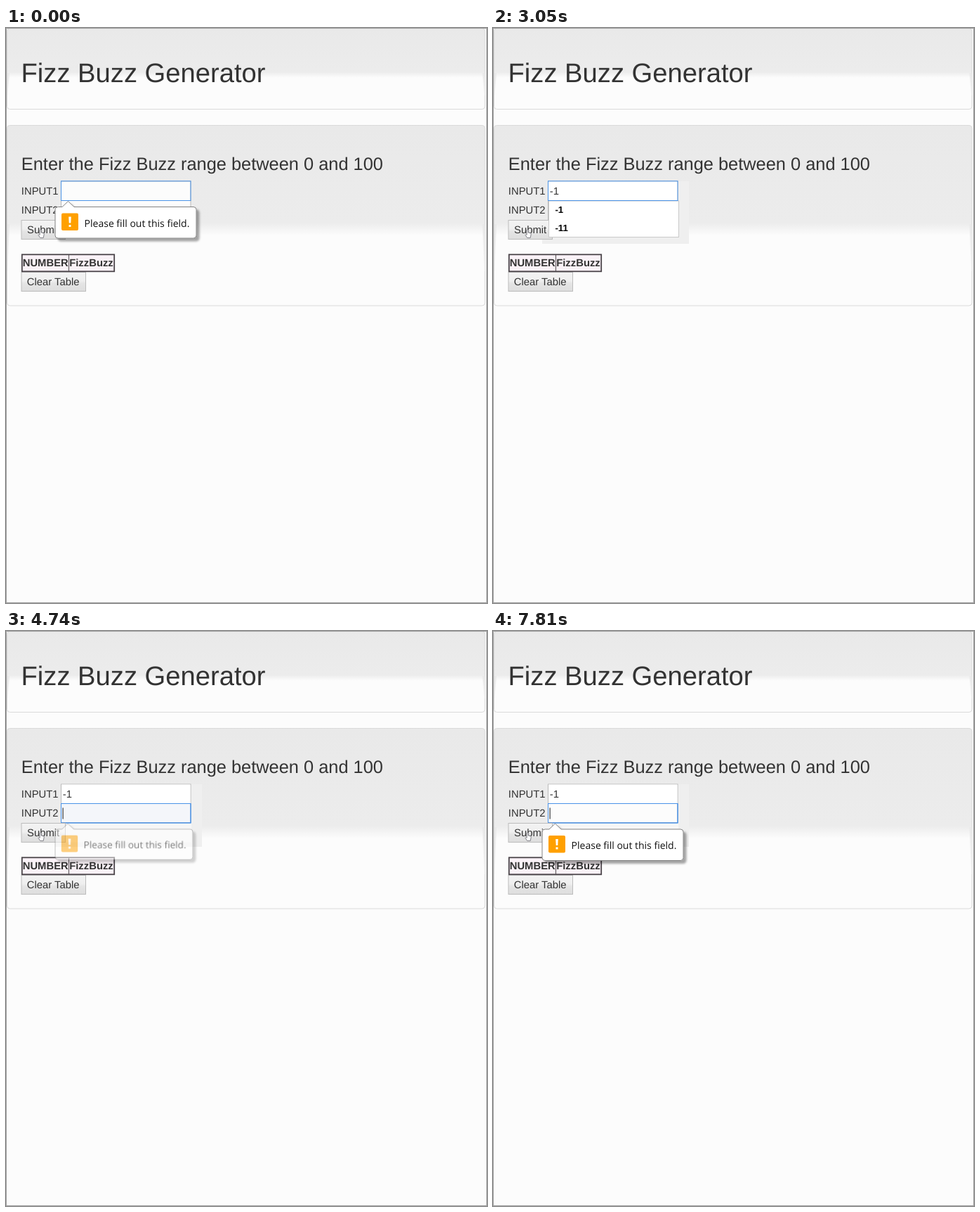
Write an HTML page that moves like this. It is 685 px wide and 818 px high and loops after 8 s.

```html
<!DOCTYPE html>
<html lang="en">
<head>
<meta charset="utf-8">
<title>Fizz Buzz Generator</title>
<style>
  html, body { margin: 0; width: 100%; height: 100%; overflow: hidden; background: #fcfcfc; }
  svg { display: block; width: 685px; height: 818px; }
  text { font: 14.84px "Liberation Sans", Arial, sans-serif; fill: #333; text-rendering: geometricPrecision; }
  .title { font-size: 38.2px; }
  .lead { font-size: 25.4px; }
  .head { font-weight: bold; }
  .item { font-size: 13.2px; font-weight: bold; fill: #000; }
  .hint { font: 14px "Open Sans", "Noto Sans", sans-serif; fill: #111; }
  .field { fill: #fcfcfc; stroke: #b9b9b9; }
  .focus { fill: none; stroke: #4a93e8; }
  .caret { fill: #111; }

  /* one 8 s timeline; every part switches hard */
  .on { animation: 8s step-end infinite; }
  .tip1 { animation-name: tip1; }
  .focus1 { animation-name: focus1; }
  .focus2 { animation-name: focus2; }
  .caret-empty { animation-name: caretEmpty; }
  .minus { animation-name: minus; }
  .number { animation-name: number; }
  .caret-number { animation-name: caretNumber; }
  .list { animation-name: list; }
  .trail { animation-name: trail; }
  .patch { animation-name: patch; }
  .caret2 { animation-name: caret2; }
  .tint { animation-name: tint; }
  .pressed { animation-name: pressed; }
  .tip2 { animation-name: tip2; transform-origin: 70px 274px; }

  @keyframes tip1 { 0% { opacity: 1 } 16.375%, 100% { opacity: 0 } }
  @keyframes focus1 { 0% { opacity: 1 } 44.75%, 100% { opacity: 0 } }
  @keyframes focus2 { 0%, 55.875% { opacity: 0 } 44.75%, 57.75%, 100% { opacity: 1 } }
  @keyframes caretEmpty { 0%, 7.875%, 16.375%, 100% { opacity: 0 } 1.5%, 14.5% { opacity: 1 } }
  @keyframes minus { 0%, 17.875%, 100% { opacity: 0 } 16.375% { opacity: 1 } }
  @keyframes number { 0% { opacity: 0 } 17.875%, 100% { opacity: 1 } }
  @keyframes caretNumber { 0%, 24.125%, 38.125%, 100% { opacity: 0 } 17.875%, 31.875% { opacity: 1 } }
  @keyframes list { 0%, 44.75%, 100% { opacity: 0 } 16.375% { opacity: 1 } }
  @keyframes trail { 0% { opacity: 0 } 16.375%, 100% { opacity: 1 } }
  @keyframes patch { 0% { opacity: 0 } 44.75%, 100% { opacity: 1 } }
  @keyframes caret2 {
    0%, 51%, 55.875%, 64.125%, 76.625%, 90.25% { opacity: 0 }
    44.75%, 57.75%, 70.125%, 83.625%, 97.625%, 100% { opacity: 1 }
  }
  @keyframes tint { 0%, 64.125%, 100% { opacity: 0 } 57.75% { opacity: 1 } }
  @keyframes pressed { 0%, 57.75%, 100% { opacity: 0 } 55.875% { opacity: 1 } }
  @keyframes tip2 {
    0% { opacity: 0; transform: scale(.97) }
    59.25% { opacity: .5; transform: scale(.975) }
    61.125% { opacity: .85; transform: scale(.985) }
    62.625% { opacity: 1; transform: scale(.993) }
    64.125% { opacity: 1; transform: scale(.997) }
    65.625%, 100% { opacity: 1; transform: none }
  }
</style>
</head>
<body>
<svg viewBox="0 0 685 818">
  <defs>
    <linearGradient id="shade1" x2="0" y2="1">
      <stop stop-color="#e9e9e9"/><stop offset=".54" stop-color="#ececec"/>
      <stop offset=".61" stop-color="#fcfcfc"/>
    </linearGradient>
    <linearGradient id="shade2" x2="0" y2="1">
      <stop stop-color="#e9e9e9"/><stop offset=".54" stop-color="#ececec"/>
      <stop offset=".61" stop-color="#fcfcfc"/>
    </linearGradient>
    <linearGradient id="side" x2="0" y2="1">
      <stop stop-color="#e9e9e9"/><stop offset="1" stop-color="#f8f8f8"/>
    </linearGradient>
    <linearGradient id="face" x2="0" y2="1">
      <stop stop-color="#f3f3f3"/><stop offset=".45" stop-color="#efefef"/>
      <stop offset=".6" stop-color="#e4e4e4"/><stop offset="1" stop-color="#dedede"/>
    </linearGradient>
    <filter id="soft" x="-10%" y="-20%" width="120%" height="150%">
      <feDropShadow dx="4" dy="4" stdDeviation="1.5" flood-color="#000" flood-opacity=".35"/>
    </filter>
    <g id="tip">
      <path filter="url(#soft)" fill="#fff" stroke="#828282"
        d="M74.5 254.5H80L88.5 246.5L97 254.5H267a4 4 0 0 1 4 4V295a4 4 0 0 1-4 4H74a4 4 0 0 1-4-4V258.5a4 4 0 0 1 4-4Z"/>
      <rect x="79" y="263.5" width="24" height="24.5" rx="2" fill="#ffa000"/>
      <path d="M89.2 268.5h3.6l-.5 9h-2.6ZM89.5 280h3v3h-3Z" fill="#fff"/>
      <text class="hint" x="111.6" y="282.6">Please fill out this field.</text>
    </g>
  </defs>

  <rect width="685" height="818" fill="#fcfcfc"/>

  <!-- panels -->
  <rect x="1.5" y=".5" width="680.5" height="115" rx="4" fill="url(#shade1)" stroke="#dadada"/>
  <path d="M2 64H5L2.5 96H2ZM681.5 64H678.5L681 96H681.5Z" fill="url(#side)"/>
  <rect x="1.5" y="138.5" width="680.5" height="256.5" rx="4" fill="url(#shade2)" stroke="#dadada"/>
  <path d="M2 279H5L2.5 346H2ZM681.5 279H678.5L681 346H681.5Z" fill="url(#side)"/>
  <rect x=".5" y=".5" width="684" height="817" fill="none" stroke="#a0a0a0"/>

  <text class="title" x="21.5" y="77">Fizz Buzz Generator</text>
  <text class="lead" x="21.8" y="202">Enter the Fizz Buzz range between 0 and 100</text>
  <path class="on trail" d="M264 218H279V307H70V290H264Z" fill="#efefef"/>
  <rect class="on patch" x="80" y="273" width="184" height="27.5" fill="#f6f6f6"/>
  <text x="21.8" y="236.5">INPUT1</text>
  <text x="21.8" y="264">INPUT2</text>

  <!-- second field -->
  <rect class="field" x="78.5" y="245.5" width="184.5" height="27"/>
  <rect class="on tint" x="79" y="246" width="183.5" height="26" fill="#f4f6fa"/>
  <rect class="on focus2 focus" x="78.5" y="245.5" width="184.5" height="27.5"/>
  <rect class="on caret2 caret" x="80.6" y="251.5" width="1" height="16"/>

  <!-- first field -->
  <rect class="field" x="78.5" y="218" width="184.5" height="27.5"/>
  <rect class="on trail" x="79" y="218.5" width="183.5" height="26.5" fill="#fff"/>
  <rect class="on focus1 focus" x="78.5" y="217.8" width="184.5" height="27.7"/>
  <rect class="on caret-empty caret" x="80.6" y="224" width="1" height="16"/>
  <g class="on minus">
    <text x="80.7" y="236.5">-</text>
    <rect class="caret" x="86" y="223.5" width="1" height="16.5"/>
  </g>
  <text class="on number" x="80.7" y="236.5">-1</text>
  <rect class="on caret-number caret" x="93.3" y="223.5" width="1" height="16.5"/>
  <rect class="on focus2 focus" x="78.5" y="245.5" width="184.5" height="27.5"/>

  <!-- buttons -->
  <rect x="22" y="273.5" width="62.5" height="27" fill="url(#face)" stroke="#bcbcbc"/>
  <rect class="on pressed" x="22" y="273.5" width="62.5" height="27" fill="#e6e6e6" fill-opacity=".5" stroke="#b4b4b4"/>
  <text x="30" y="291.8">Submit</text>
  <rect x="22" y="347.5" width="91.5" height="27" fill="url(#face)" stroke="#bcbcbc"/>
  <text x="29.8" y="366">Clear Table</text>

  <!-- result table -->
  <rect x="22.8" y="322.3" width="131.4" height="24" fill="#faf2f7" stroke="#4b454a" stroke-width="1.8"/>
  <path d="M89.5 323V346" stroke="#554d53"/>
  <text class="head" x="23.7" y="339.4">NUMBER</text>
  <text class="head" x="90.2" y="339.4">FizzBuzz</text>

  <!-- suggestions -->
  <g class="on list">
    <rect x="79.5" y="246" width="185" height="51.5" fill="#fff" stroke="#cacaca"/>
    <path class="focus" d="M78.5 245.5H263.5"/>
    <text class="item" x="88.4" y="263">-1</text>
    <text class="item" x="88.4" y="288.6">-11</text>
  </g>

  <!-- hand pointer -->
  <path d="M48.2 293V287.5q1-1.4 2 0V291l3.2.7q1 .5.7 2.3L53.2 298.5H48.8L46 294.5q.4-1.5 2.2-.3Z"
    fill="#fff" stroke="#74747c" stroke-width=".9"/>

  <use class="on tip1" href="#tip"/>
  <g class="on tip2"><use href="#tip" y="27.5"/></g>
</svg>
</body>
</html>
```
